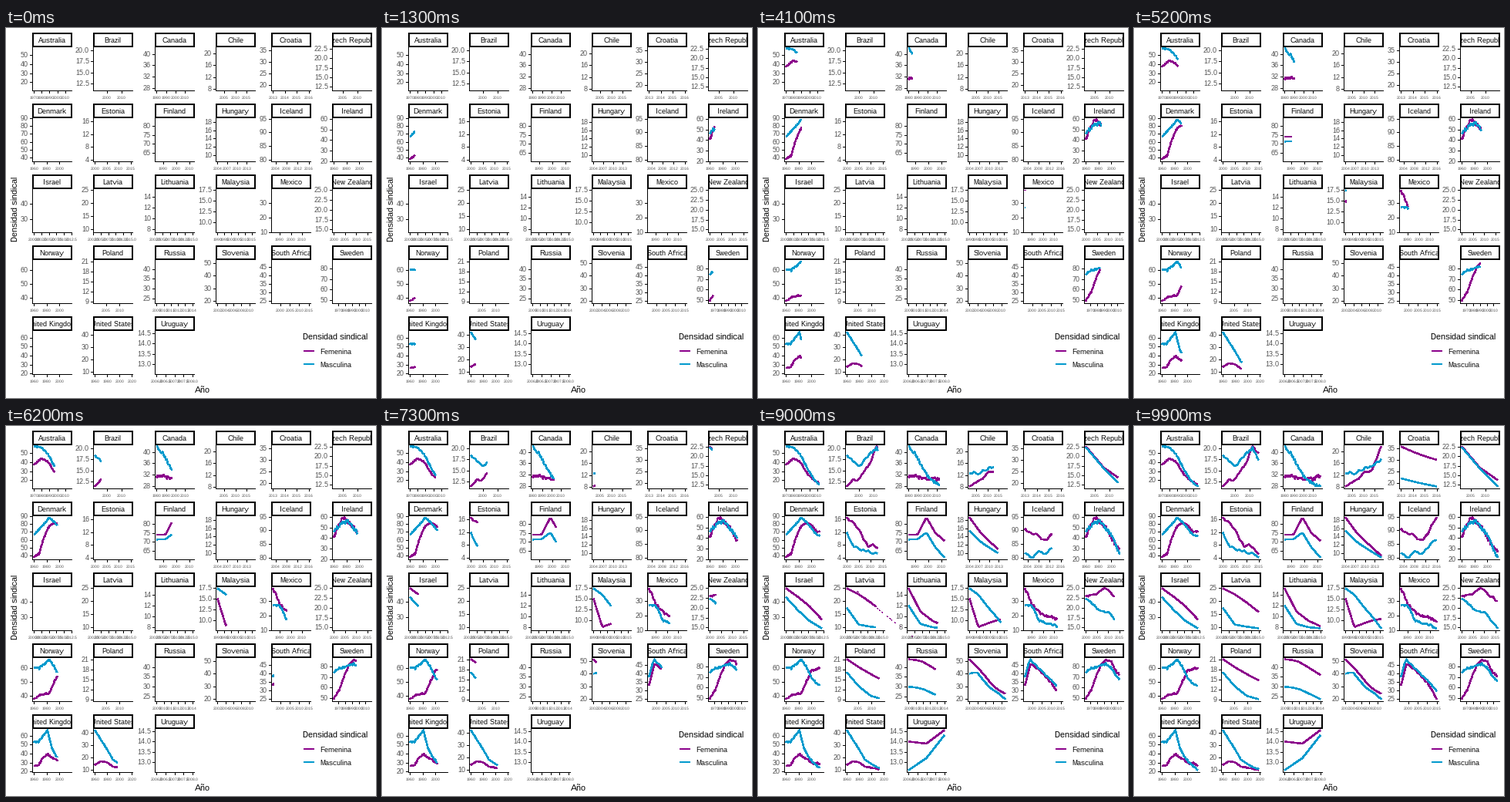
Recreate the animation shown at these times as a matplotlib script. Size 480 by 480 pixels, loop 10000 ms.

```python
import numpy as np
import matplotlib.pyplot as plt
from matplotlib.animation import FuncAnimation
from matplotlib.patches import Rectangle

SIZE, FRAMES, PX = 480, 100, 0.72  # PX: points per pixel at 100 dpi
START, SPAN = 1960, 58
FEM, MASC, GREY = "#8B008B", "#009ACD", "#4D4D4D"
LEFTS = (34, 113, 193, 272, 344, 423)
ROW_STEP, WIDTH, TOP, BOTTOM = 92, 51, 24, 81
MARGIN = 0.05

plt.rcParams.update({
    "font.family": "Liberation Sans",
    "text.hinting": "native",
    "text.hinting_factor": 1,
})
rng = np.random.default_rng(4)

fig = plt.figure(figsize=(4.8, 4.8), dpi=100, facecolor="white")
ax = fig.add_axes([0, 0, 1, 1])
ax.set_xlim(0, SIZE)
ax.set_ylim(SIZE, 0)
ax.axis("off")

curves = []


def label(x, y, s, size=9, color="black", ha="left", va="baseline", **kw):
    return ax.text(x, y, s, fontsize=size * PX, color=color, ha=ha, va=va, **kw)


def stroke(xs, ys, color="black", width=1, **kw):
    return ax.plot(xs, ys, color=color, lw=width * PX, antialiased=False,
                   solid_capstyle="butt", solid_joinstyle="round", **kw)[0]


def axis(lo, hi, step, start, end):
    """Return the scale onto start..end and the labelled breaks inside it."""
    pad = (hi - lo) * MARGIN
    lo, hi = lo - pad, hi + pad
    breaks = np.arange(np.ceil(lo / step), np.floor(hi / step) + 1) * step
    digits = 0 if np.all(breaks == breaks.round()) else 1

    def place(v):
        return start + (v - lo) / (hi - lo) * (end - start)

    return place, [(place(b), f"{b:.{digits}f}") for b in breaks]


def yearly(years, keys, wiggle):
    """Join evenly spaced key values and roughen them year by year."""
    vals = np.interp(years, np.linspace(years[0], years[-1], len(keys)), keys)
    noise = rng.uniform(-wiggle, wiggle, len(years))
    noise[[0, -1]] = 0
    return vals + noise


def panel(name, first, last, xstep, ystep, fem, masc, wiggle=0):
    row, col = divmod(len(curves) // 2, len(LEFTS))
    x0, y0 = LEFTS[col], row * ROW_STEP
    bottom = y0 + BOTTOM
    lo, hi = min(fem + masc), max(fem + masc)
    sx, xticks = axis(first, last, xstep, x0, x0 + WIDTH)
    sy, yticks = axis(lo, hi, ystep, bottom, y0 + TOP)

    stroke([x0, x0], [y0 + TOP, bottom])
    stroke([x0, x0 + WIDTH], [bottom, bottom])
    for y, s in yticks:
        stroke([x0 - 3, x0], [y, y])
        label(x0 - 5, round(y) + 3, s, color=GREY, ha="right")
    for x, s in xticks:
        stroke([x, x], [bottom, bottom + 3])
        label(x, bottom + 11, s, size=5, color=GREY, ha="center")

    ax.add_patch(Rectangle((x0 + 1, y0 + 7), WIDTH - 1, 17, fc="white",
                           ec="black", lw=2 * PX, zorder=2.5))
    title = label(x0 + WIDTH / 2, y0 + 19, name, ha="center", clip_on=True)
    title.set_clip_path(Rectangle((x0, y0 + 6), WIDTH, 18,
                                  transform=ax.transData))

    years = np.arange(first, last + 1)
    for keys, color in ((fem, FEM), (masc, MASC)):
        vals = np.clip(yearly(years, keys, wiggle), lo, hi)
        line = stroke([], [], color, 1.5, zorder=2.4)
        curves.append((line, years, vals, sx, sy))


# name, first and last year, axis steps, key values for women and men, roughness
panel("Australia", 1970, 2016, 10, 10,
      [37, 44, 40, 27, 19.5, 15.5], [57.3, 56.5, 48.5, 33, 20, 13.1], .7)
panel("Brazil", 1992, 2016, 10, 2.5,
      [11.4, 12.8, 13, 15, 17, 20.4, 18.9], [18.4, 17.1, 15.9, 17.2, 19, 20, 17.4], .3)
panel("Canada", 1980, 2018, 10, 4,
      [31, 31.5, 30.5, 30.4, 30.5, 31.6], [42, 39.2, 34, 30.2, 28.8, 27.8], .6)
panel("Chile", 2002, 2018, 5, 4,
      [8.2, 9.6, 12.4, 14, 21.7], [12.7, 12.8, 14.1, 15, 17.4], .5)
panel("Croatia", 2013, 2016, 1, 5, [35.8, 32.4, 30], [22, 20, 18.5])
panel("Czech Republic", 2002, 2014, 5, 2.5, [22.6, 17, 13.7], [22.4, 16.8, 12])

panel("Denmark", 1960, 2016, 20, 10,
      [37.6, 42, 64, 77.5, 81.5, 79, 70, 71], [66.5, 73, 80, 88.4, 82.5, 75, 66, 64.5], 1)
panel("Estonia", 2000, 2015, 5, 4,
      [16.6, 15, 11.2, 7.6, 7.8, 5.2], [11.9, 7.4, 6.1, 6, 5.2, 4.1], .5)
panel("Finland", 1985, 2012, 10, 5,
      [74, 74, 83.6, 75, 70.7], [71.3, 71.5, 75.2, 67, 61.4])
panel("Hungary", 2004, 2015, 3, 2, [18.6, 14.7, 12, 9.4], [15.4, 12.6, 10.7, 9])
panel("Iceland", 2003, 2016, 4, 5,
      [90.6, 89, 88, 85.6, 90, 94.7], [81.8, 80.2, 82.4, 81, 84.8, 86.5], .6)
panel("Ireland", 1960, 2016, 20, 10,
      [40.5, 54, 59.6, 54, 50, 40, 33, 27], [47, 52, 56, 55, 49, 43, 32, 21.8], 2)

panel("Israel", 2000, 2012, 2.5, 10, [48.5, 43, 36.8, 28.5], [42.8, 34.4, 27.4, 22.8])
panel("Latvia", 2003, 2015, 2.5, 5, [24.8, 22.5, 19.4, 15.8], [17.3, 11, 10.2, 9.6])
panel("Lithuania", 2003, 2015, 2.5, 2, [15.2, 10.9, 9.2, 8.2], [12, 8.6, 8, 7.8])
panel("Malaysia", 1990, 2016, 5, 2.5,
      [15, 8.4, 9.2, 9.9, 10.3], [17.4, 15.9, 13.2, 10.8, 8.1])
panel("Mexico", 1984, 2016, 10, 10,
      [38.5, 27.5, 22, 19.5, 18.5, 15.5], [26.8, 26.4, 16.5, 14.8, 13.5, 11.3], .9)
panel("New Zealand", 2000, 2016, 5, 2.5,
      [23.1, 23.3, 24.1, 24.9, 23.1, 21.7], [22.3, 20.7, 19.6, 19, 17, 14.8], .4)

panel("Norway", 1960, 2016, 20, 10,
      [37.6, 40.2, 41.4, 41.8, 50, 57.8, 59, 60], [60.2, 59.6, 62.5, 66, 60.5, 53, 48.5, 47], .6)
panel("Poland", 2001, 2014, 5, 3, [21.2, 18.8, 16.7, 14.8], [17.2, 13, 10.1, 9.1])
panel("Russia", 2009, 2014, 1, 5, [43.9, 43.3, 39.8, 36], [30, 29.4, 26.7, 23.7])
panel("Slovenia", 2002, 2011, 2, 10,
      [51.4, 45.6, 39.6, 32.4, 27.4, 24.3], [40, 41.5, 34.5, 28.2, 25, 20])
panel("South Africa", 1996, 2015, 5, 5,
      [33, 45, 44, 41, 38.3, 35, 30.5, 24.8], [38, 48.4, 45, 42.4, 39.5, 36.3, 33, 29.6], .7)
panel("Sweden", 1963, 2016, 10, 10,
      [49, 57, 71, 82, 86.9, 84, 75, 70.5], [75, 78.2, 79.2, 81, 82.5, 79, 70, 66.5], 1)

panel("United Kingdom", 1960, 2016, 20, 10,
      [26, 27, 35, 39.5, 35.5, 33, 28.5, 29.5, 26],
      [53.5, 53, 60, 66.4, 47, 37, 30, 26, 21.4], .8)
panel("United States", 1960, 2018, 20, 10,
      [14, 17, 16.2, 12.8, 11.8, 11, 9.8], [42.1, 34.5, 27, 18.5, 15, 12.2, 10.6], .2)
panel("Uruguay", 2006, 2008, .5, .5, [14, 13.9, 14.55], [12.62, 13.2, 14.3])

label(254.5, 473, "Año", 11, ha="center")
label(12, 235, "Densidad sindical", 11, ha="center", va="center", rotation=90)
label(385, 404, "Densidad sindical", 11)
for y, name, color in ((419, "Femenina", FEM), (436, "Masculina", MASC)):
    stroke([386, 400], [y, y], color, 2)
    label(407, y + 4, name)


def update(i):
    now = START + SPAN * i / (FRAMES - 1)
    for line, years, vals, sx, sy in curves:
        xs = np.append(years[years < now], min(now, years[-1]))
        ys = np.interp(xs, years, vals)
        shown = now > years[0]
        line.set_data(sx(xs) if shown else [], sy(ys) if shown else [])
    return [c[0] for c in curves]


anim = FuncAnimation(fig, update, frames=FRAMES, interval=100, repeat=True,
                     repeat_delay=0, blit=False)
plt.show()
```
